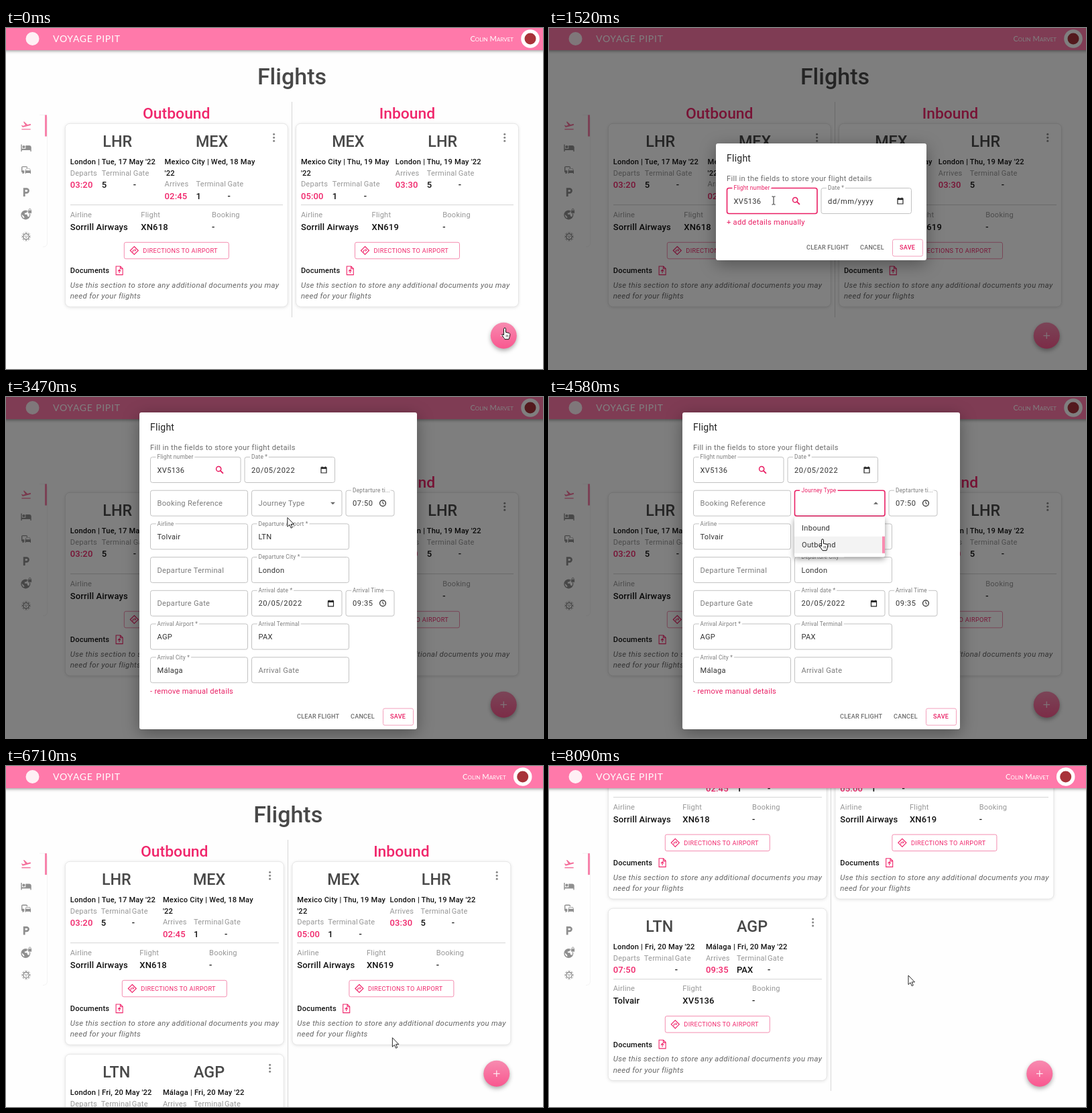
Animation, 801 px wide and 508 px high, one loop 8.27 s. Source, as an HTML page:

```html
<!DOCTYPE html>
<html lang="en">
<head>
<meta charset="utf-8">
<title>Flights</title>
<style>
html, body { margin: 0; width: 100%; height: 100%; overflow: hidden; background: #fefefe; }
svg { display: block; }
text { font: 400 11.1px Roboto, sans-serif; letter-spacing: .28px; fill: #333; white-space: pre; }
.h1 { font-size: 34px; font-weight: 500; letter-spacing: 0; fill: #484848; }
.h2 { font-size: 22.9px; font-weight: 500; letter-spacing: 0; fill: #f0266b; }
.code { font-size: 23.3px; font-weight: 500; letter-spacing: 0; fill: #484848; }
.city { font-weight: 500; letter-spacing: .2px; fill: #111; }
.dim { fill: #979797; letter-spacing: .2px; }
.val { font-size: 13px; font-weight: 500; letter-spacing: .15px; fill: #111; }
.time { fill: #f0266b; }
.note { font-size: 11.4px; font-style: italic; letter-spacing: .33px; fill: #666; }
.act { font-size: 9.2px; letter-spacing: .33px; fill: #f0266b; }
.foot { font-size: 9.1px; font-weight: 500; letter-spacing: .22px; fill: #6c6c6c; }
.title { font-size: 14px; letter-spacing: .25px; fill: #222; }
.sub { fill: #6c6c6c; letter-spacing: .31px; }
.link { fill: #e91e63; }
.num { letter-spacing: .62px; }
.lab { paint-order: stroke; stroke: #fff; stroke-width: 5.5px; stroke-linejoin: round; }
.brand { font: 400 14px Lato, sans-serif; letter-spacing: .75px; fill: #fff; }
.user { font: 400 11.2px Lato, sans-serif; font-variant: small-caps; letter-spacing: 0; fill: #fff; }
.card { fill: #fff; stroke: #e5e5e5; filter: drop-shadow(0 1px 2px rgba(0,0,0,.1)); }
.bar { filter: drop-shadow(0 1px 2.5px rgba(0,0,0,.45)); }
.paper { fill: #fff; filter: drop-shadow(0 6px 12px rgba(0,0,0,.35)); }
.menu { fill: #fff; filter: drop-shadow(0 3px 4px rgba(0,0,0,.4)); }
.fab { filter: drop-shadow(0 3px 3px rgba(0,0,0,.32)); }
</style>
</head>
<body>
<svg id="stage" width="801" height="508" viewBox="0 0 801 508"></svg>
<script>
const LOOP = 8270, STEP = 139.6;
const PINK = '#e91e63', HOT = '#f0266b', GREY = '#8f8f8f';
const FLIGHT = 'XV5136', AIRLINE = 'Tolvair', CARRIER = 'Sorrill Airways';

const clamp = v => Math.max(0, Math.min(1, v));
const ramp = (t, start, length) => clamp((t - start) / length);
const smooth = p => p * p * (3 - 2 * p);
const mix = (a, b, p) => a + (b - a) * p;
const within = (t, a, b) => t >= a && t < b;

const text = (x, y, s, cls = '', more = '') => `<text x="${x}" y="${y}" class="${cls}" ${more}>${s}</text>`;
const mid = (x, y, s, cls) => text(x, y, s, cls, 'text-anchor="middle"');
const rect = (x, y, w, h, more = '') => `<rect x="${x}" y="${y}" width="${w}" height="${h}" ${more}/>`;
const circle = (x, y, r, more = '') => `<circle cx="${x}" cy="${y}" r="${r}" ${more}/>`;
const path = (d, more = '') => `<path d="${d}" ${more}/>`;
const line = (d, color, width = 1) => path(d, `fill="none" stroke="${color}" stroke-width="${width}"`);
const rule = (x, y, w, h) => rect(x, y, w, h, 'fill="#d6d6d6" shape-rendering="crispEdges"');
const at = (x, y, s, scale = 1) => `<g transform="translate(${x} ${y}) scale(${scale})">${s}</g>`;
const icon = (x, y, s, color) => `<g fill="${color}" fill-rule="evenodd">${at(x - 8.4, y - 8.4, s, .7)}</g>`;

const spokes = Array.from({ length: 8 }, (_, i) =>
  `<g transform="rotate(${i * 45} 12 12)">${path('M11 2h2v5h-2zM10 2h4v1.6h-4z')}</g>`).join('');
const SIDE = [
  path('M2.5 19h19v2h-19zm19.57-9.36c-.21-.8-1.04-1.28-1.84-1.06L14.92 10l-6.9-6.43-1.93.51 4.14 7.17-4.97 1.33-1.97-1.54-1.45.39 2.59 4.49L21 11.49c.81-.23 1.28-1.05 1.07-1.85z'),
  path('M7 13a3 3 0 1 0 0-6a3 3 0 0 0 0 6zm12-6h-8v7H3V5H1v15h2v-3h18v3h2v-9c0-2.2-1.8-4-4-4z'),
  path('M12 4H5C3 4 2 5 2 7v8c0 2 1.5 3 3 3l-1 1v1h2l2-2v-5H4V6h9v2h2V7c0-2-1-3-3-3z') +
    path('M20.6 9.7q-.3-.7-1-.7h-7.2q-.7 0-1 .7L10 14v6h1.5v-1.5h9V20H22v-6zM12.4 10h7.2l1 3h-9.2z'),
  path('M13 3H6v18h4v-6h3a6 6 0 0 0 0-12zm.2 8H10V7h3.2a2 2 0 0 1 0 4z'),
  circle(11, 13, 10) + path('M3 12l5 5v3q-5-2-5-8zm9-8l3 2-3 3H9v3h5l1 4 3 1q2-3 1-6l-3-3z', 'fill="#fff"') +
    rect(16, 3, 8, 7, 'rx="1" stroke="#fff"') + line('M18 4V2a2 2 0 0 1 4 0v2', GREY, 1.3),
  spokes + circle(12, 12, 6, `fill="#fff" stroke="${GREY}" stroke-width="2"`) +
    circle(10, 11, 1.2) + circle(14, 11, 1.2) + circle(12, 14, 1.2)
];

const CURSORS = {
  arrow: path('M0 0V13.6l3.1-2.9 2.1 4.9 2.1-.9-2.1-4.8h4.3z', 'fill="#fff" stroke="#111" stroke-width=".9"'),
  hand: path('M-1.5 1.3a1.5 1.5 0 0 1 3 0v5l5 1.2q1.5.5 1.3 2.2l-.8 4-1 3h-6l-4-6q-.5-2 1-1.6l1.5 1.4z', 'fill="#fff" stroke="#111"') +
    line('M2.3 10v3.5M4.5 10v3.5', '#111', .7),
  beam: line('M-2.5-6H-.7L0-5.3.7-6H2.5M0-5.3V5.3M-2.5 6H-.7L0 5.3.7 6H2.5', '#222')
};

// time, x, y, cursor shape
const POINTER = [
  [0, 744, 447, 'hand'], [690, 744, 447, 'hand'], [825, 640, 393, 'arrow'], [967, 497, 307, 'arrow'],
  [1105, 335, 257, 'beam'], [1530, 335, 257, 'beam'], [1665, 440, 258, 'beam'], [1945, 440, 258, 'beam'],
  [2220, 371, 256, 'hand'], [2490, 371, 256, 'beam'], [3060, 371, 256, 'beam'], [3200, 385, 236, 'arrow'],
  [3620, 432, 160, 'hand'], [4180, 432, 160, 'hand'], [4590, 408, 212, 'hand'], [5010, 408, 212, 'hand'],
  [5290, 592, 473, 'arrow'], [6350, 592, 473, 'arrow'], [6410, 585, 440, 'arrow'],
  [7250, 552, 305, 'arrow'], [7530, 552, 305, 'arrow'], [8087, 536, 312, 'arrow']
];

function pointer(t) {
  const i = POINTER.findLastIndex(k => k[0] <= t);
  const a = POINTER[i], b = POINTER[i + 1] || a;
  const p = b === a ? 0 : smooth(ramp(t, a[0], b[0] - a[0]));
  return at(mix(a[1], b[1], p), mix(a[2], b[2], p), CURSORS[a[3]]);
}

// code, city lines, label, time, terminal
const LONDON_OUT = ['LHR', ["London | Tue, 17 May '22"], 'Departs', '03:20', '5'];
const MEXICO_IN = ['MEX', ['Mexico City | Wed, 18 May', "'22"], 'Arrives', '02:45', '1'];
const MEXICO_OUT = ['MEX', ['Mexico City | Thu, 19 May', "'22"], 'Departs', '05:00', '1'];
const LONDON_IN = ['LHR', ["London | Thu, 19 May '22"], 'Arrives', '03:30', '5'];
const LUTON = ['LTN', ["London | Fri, 20 May '22"], 'Departs', '07:50', ''];
const MALAGA = ['AGP', ["Málaga | Fri, 20 May '22"], 'Arrives', '09:35', 'PAX'];

function stop(x, y, col, [code, city, label, time, terminal]) {
  const d = (city.length - 1) * 16.5, g = col / 3;
  return mid(x + col / 2, y + 34.6, code, 'code') +
    city.map((s, i) => text(x, y + 61 + i * 16.5, s, 'city')).join('') +
    [label, 'Terminal', 'Gate'].map((s, i) => text(x + i * g, y + 77.5 + d, s, 'dim')).join('') +
    [time, terminal, '-'].map((s, i) => text(x + i * g, y + 96 + d, s, i ? 'val' : 'val time')).join('');
}

function card(x, y, w, legs, airline, flight) {
  const d = legs.some(l => l[1].length > 1) ? 16.5 : 0;
  const left = x + 7.4, inner = w - 15, col = inner * 4 / 9, third = inner / 3;
  const b = x + w / 2 - 78, low = y + d;
  return rect(x, y, w, 256.5 + d, 'rx="7" class="card"') +
    legs.map((l, i) => stop(left + i * col, y, col, l)).join('') +
    [16, 21, 26].map(v => circle(x + w - 20.7, y + v, 1.5, 'fill="#858585"')).join('') +
    rule(left, low + 104.5, inner, 1) +
    ['Airline', 'Flight', 'Booking'].map((s, i) => text(left + i * third, low + 123.3, s, 'dim')).join('') +
    [airline, flight, '-'].map((s, i) => text(left + i * third, low + 142, s, 'val')).join('') +
    rect(b, low + 160.5, 156, 24.5, 'rx="2.5" fill="#fff" stroke="#f48db0"') +
    at(b + 15, low + 172.7, line('M0-6 6 0 0 6-6 0z', HOT, 1.2) + line('M-2 2.5V-.5H2M.7-2.3 2.5-.5.7 1.3', HOT)) +
    text(b + 28, low + 176, 'DIRECTIONS TO AIRPORT', 'act') +
    text(left, low + 206.5, 'Documents', 'city') +
    at(left + 73.4, low + 202.5, line('M-5-6.3H1.5L5-2.8V6.3H-5zM1.3-6V-2.5H5M0 4V-1M-2.2 1 0-1.2 2.2 1', HOT, 1.1)) +
    text(left, low + 228, 'Use this section to store any additional documents you may', 'note') +
    text(left, low + 244.5, 'need for your flights', 'note');
}

function page(t) {
  const saved = t > 6380;
  const w = saved ? 326 : 332, x1 = 88.3, x2 = saved ? 426.9 : 432.5, split = saved ? 420.7 : 426.5;
  const right = saved ? -11.3 : 0, dy = saved ? .6 : 0;
  const scroll = 217.2 * smooth(ramp(t, 7453, 634));
  const lit = within(t, 800, 1200);
  const content = mid(split, 83.5, 'Flights', 'h1') +
    rule(split - .5, 109.5, 1, saved ? 592 : 321) +
    mid(x1 + w / 2, 134.5, 'Outbound', 'h2') + mid(x2 + w / 2, 134.5, 'Inbound', 'h2') +
    card(x1, 142.3, w, [LONDON_OUT, MEXICO_IN], CARRIER, 'XN618') +
    card(x2, 142.3, w, [MEXICO_OUT, LONDON_IN], CARRIER, 'XN619') +
    (saved ? card(x1, 429.3, w, [LUTON, MALAGA], AIRLINE, FLIGHT) : '');
  const side = line('M50 129.5h5q6.5 0 6.5 6V320q0 6-6.5 6', '#f3f3f3') +
    rect(58, 129.5, 3, 32, 'fill="#f783ab"') +
    SIDE.map((s, i) => icon(30, 145.3 + i * 33.1, s, i ? GREY : '#f4719c')).join('');
  const header = rect(-5, -5, 811, 38, 'fill="#ff79aa" class="bar"') +
    circle(39.5, 16, 10, 'fill="#fff0f5"') + text(70, 21, 'VOYAGE PIPIT', 'brand') +
    text(757 + right, 20, 'Colin Marvet', 'user', 'text-anchor="end"') +
    circle(782 + right, 16, 13.8, 'fill="#fff"') + circle(782 + right, 16, 8.5, 'fill="#a8323a"');
  const ripple = ramp(t, 260, 400);
  const fab = `<linearGradient id="glow" x2="0" y2="1"><stop stop-color="#f78bb0"/><stop offset="1" stop-color="${lit ? '#f0286a' : '#f9578f'}"/></linearGradient>` +
    circle(0, 0, 19.5, 'fill="url(#glow)" class="fab"') +
    (within(t, 260, 800) ? circle(0, 0, 19.5 * ripple, 'fill="#fff" opacity=".25"') : '') +
    line('M-4.8 0H4.8M0-4.8V4.8', '#ffe6ef', 1.3);
  return rect(0, 0, 801, 508, 'fill="#fefefe"') + at(0, -scroll, content) + at(0, dy, side) + header + at(742.3 + right * .93, 458.3, fab);
}

function field(x, y, w, label, o = {}) {
  const { value = '', up = 0, focus, hover, num } = o;
  const edge = focus ? PINK : hover ? '#222' : '#c2c2c2';
  return rect(x, y, w, 38, `rx="3" fill="none" stroke="${edge}" stroke-width="${focus ? 1.6 : 1}"`) +
    text(x + 10, mix(y + 23, y + 2.8, up), label, up > .5 ? 'lab' : '',
      `style="font-size:${mix(11.1, 8.4, up)}px;letter-spacing:${mix(.3, .2, up)}px;fill:${focus ? PINK : '#7b7b7b'}"`) +
    text(x + 10, y + 23, value, num ? 'num' : '');
}

const calendar = (x, y) => at(x, y, line('M-4-3.5H4V4.5H-4z', '#222', 1.2) + rect(-4, -3.8, 8, 2.4, 'fill="#222"') + line('M-2.5-5v2M2.5-5v2', '#222'));
const clock = (x, y) => at(x, y, circle(0, 0, 4.4, 'fill="none" stroke="#222" stroke-width="1.2"') + line('M0-2.8V0L2 1.4', '#222'));
const dateField = (x, y, label, value, o) => field(x, y, 134.5, label, { value, up: 1, num: 1, ...o }) + calendar(x + 118, y + 19);
const timeField = (x, y, label, value) => field(x, y, 72, label, { value, up: 1, num: 1 }) + clock(x + 55, y + 19);

function details(t) {
  const row = i => 89.5 + i * 49.7, L = 215.5, R = 366.5;
  const up = smooth(ramp(t, 2500, 120));
  const chosen = t > 4860, focus = within(t, 3890, 6110);
  const open = focus && !chosen;
  const plain = (x, i, label) => field(x, row(i), 145, label);
  const full = (x, i, label, value, hover) => field(x, row(i), 145, label, { value, up, hover });
  return plain(L, 1, 'Booking Reference') +
    field(R, row(1), 134.5, 'Journey Type', { value: chosen ? 'Outbound' : '', up: smooth(ramp(t, 3890, 200)), focus }) +
    at(R + 121, row(1) + 19, path(open ? 'M-3.5 1.5h7L0-2z' : 'M-3.5-1.5h7L0 2z', 'fill="#666"')) +
    timeField(507, row(1), 'Deptarture ti...', '07:50') +
    full(L, 2, 'Airline', AIRLINE) + full(R, 2, 'Departure Airport *', 'LTN') +
    plain(L, 3, 'Departure Terminal') + full(R, 3, 'Departure City *', 'London', within(t, 2490, 3060)) +
    plain(L, 4, 'Departure Gate') + dateField(R, row(4), 'Arrival date *', '20/05/2022') +
    timeField(507, row(4), 'Arrival Time', '09:35') +
    full(L, 5, 'Arrival Airport *', 'AGP') + full(R, 5, 'Arrival Terminal', 'PAX') +
    full(L, 6, 'Arrival City *', 'Málaga') + plain(R, 6, 'Arrival Gate');
}

function menu(t) {
  const show = ramp(t, 3890, 230) * (1 - ramp(t, 4860, 200));
  if (!show) return '';
  const hot = t > 4450 ? 1 : within(t, 4300, 4450) ? 0 : -1;
  return `<g opacity="${show}">` + rect(366, 178.5, 135, 60, 'rx="2.5" class="menu"') +
    (hot < 0 ? '' : rect(366, 183 + hot * 24.7, 135, 25, 'fill="#f3f3f3"') + rect(497, 183 + hot * 24.7, 4, 25, 'fill="#f98bb0"')) +
    text(377, 199, 'Inbound') + text(377, 223.7, 'Outbound') + '</g>';
}

function dialog(t) {
  const show = ramp(t, 905, 175);
  if (!show || t > 6380) return '';
  const big = t > 2480;
  const [x, y, w, h] = big ? [199, 23, 414, 472] : [249, 172, 314, 174];
  const top = y + 66.5, left = x + 16.5, foot = y + h - 16, end = x + w;
  const typed = FLIGHT.slice(0, Math.max(0, Math.floor((t - 1240) / 45)));
  const hover = ramp(t, 2140, 80) * (1 - ramp(t, 2560, 300));
  const ring = ramp(t, 2320, 150), ringFade = 1 - ramp(t, 2560, 300);
  const sx = left + 103, saveHover = t > 5270, press = ramp(t, 6100, 160);
  const search = rect(sx - 22, top + 6, 44, 25, `fill="${PINK}" opacity="${hover * .04}"`) +
    (ring ? circle(sx + 1, top + 18, 15.5 * ring, `fill="${PINK}" opacity="${ringFade * .22}"`) : '') +
    at(sx, top + 19, circle(-1.3, -1.3, 3.6, `fill="none" stroke="${PINK}" stroke-width="1.5"`) + line('M1.4 1.4 5.4 5.4', PINK, 1.8));
  const save = `<clipPath id="save">${rect(end - 51, foot - 15, 45.5, 25)}</clipPath>` +
    rect(end - 50.5, foot - 15, 45, 25, `rx="2.5" fill="${saveHover ? '#fef2f6' : '#fff'}" stroke="${saveHover ? '#ec5b8c' : '#f3a0bc'}"`) +
    (press ? `<g clip-path="url(#save)">${circle(end - 23, foot - 2, 17 * press, 'fill="#f8c0d3"')}</g>` : '') +
    text(end - 40, foot, 'SAVE', 'foot', `style="fill:${press ? '#d980a0' : PINK}"`);
  return rect(0, 0, 801, 508, `opacity="${show / 2}"`) + `<g opacity="${show}">` +
    rect(x, y, w, h, 'rx="3" class="paper"') +
    text(left - .5, y + 27, 'Flight', 'title') +
    text(left - .5, y + 56, 'Fill in the fields to store your flight details', 'sub') +
    field(left, top, 134.5, 'Flight number', { value: typed, up: smooth(ramp(t, 1190, 160)), focus: within(t, 1190, 1650) }) + search +
    dateField(left + 140.5, top, 'Date *', t > 1790 ? '20/05/2022' : 'dd/mm/yyyy', { focus: within(t, 1650, 2300) }) +
    (big ? details(t) : '') +
    text(left - .5, big ? 441.5 : 293, big ? '- remove manual details' : '+ add details manually', 'link') +
    text(end - 179, foot, 'CLEAR FLIGHT', 'foot') + text(end - 99, foot, 'CANCEL', 'foot') + save + menu(t) + '</g>';
}

const stage = document.getElementById('stage');
let shown;

function draw(now) {
  const n = Math.floor((now % LOOP - 105) / STEP);
  if (n !== shown) {
    shown = n;
    const t = n < 0 ? 0 : 130 + n * STEP;
    stage.innerHTML = page(t) + dialog(t) + pointer(t);
  }
}

const start = performance.now();
function tick() {
  draw(performance.now() - start);
  requestAnimationFrame(tick);
}
tick();
</script>
</body>
</html>
```
